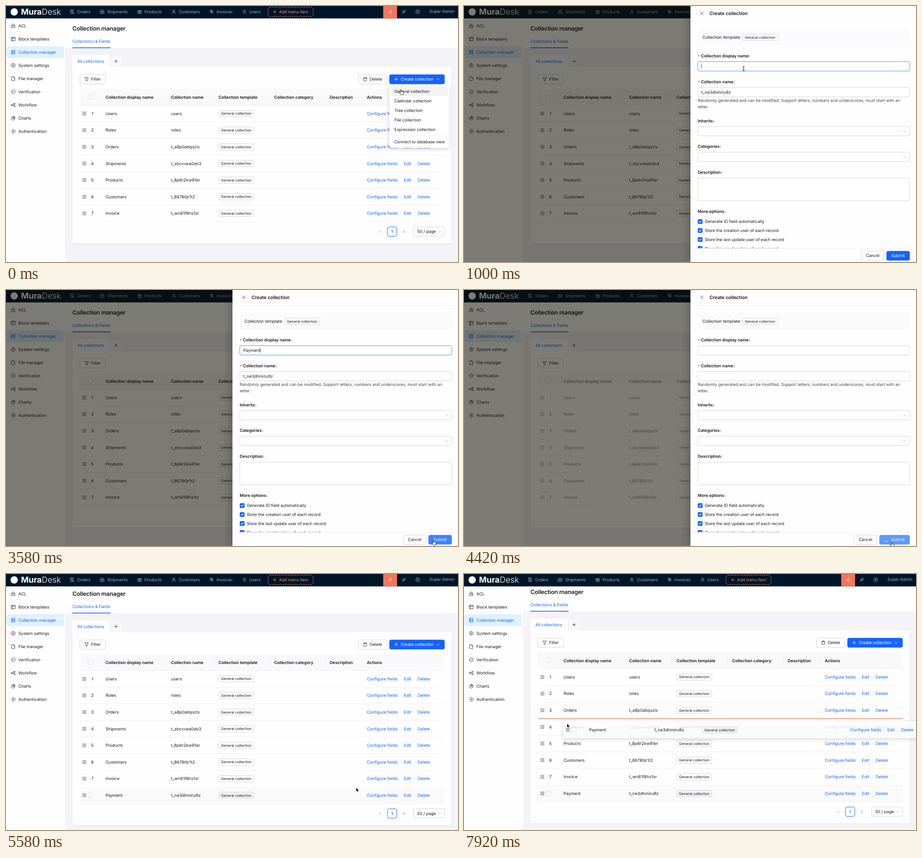
An HTML page that plays this animation: 994x563 px, repeating every 8 s.

```html
<!DOCTYPE html>
<html lang="en">
<head>
<meta charset="utf-8">
<title>Collection manager</title>
<style>
html, body { margin: 0; width: 100%; height: 100%; overflow: hidden; background: #fff; }
svg { position: fixed; left: 0; top: 0; width: 994px; height: 563px; display: block; }
text { font: 400 9.15px Inter, "Liberation Sans", sans-serif; letter-spacing: -.05px; fill: #1c1c1f; text-rendering: geometricPrecision; white-space: pre; }
.b { font-weight: 600; letter-spacing: 0; fill: #17171a; }
.h1 { font-weight: 600; font-size: 12.8px; letter-spacing: -.2px; }
.h2 { font-weight: 600; font-size: 10.4px; letter-spacing: -.1px; }
.tag { font-size: 7.95px; letter-spacing: -.04px; }
.key { letter-spacing: .05px; }
.blue { fill: #1463ff; }
.nav { fill: #a6adb4; }
.orange { fill: #f18b62; }
.white { fill: #fff; }
.soft { fill: #48484d; }
.red { fill: #ff4d4f; }
.mid { text-anchor: middle; }
.logo { font-size: 18px; letter-spacing: 0; fill: #fff; }
.i { fill: none; stroke: #333338; stroke-width: .9; stroke-linecap: round; stroke-linejoin: round; }
</style>
</head>
<body>
<svg id="stage" viewBox="0 0 994 563" xmlns="http://www.w3.org/2000/svg"></svg>
<script>
const BLUE = '#1463ff', LINE = '#d5d5d9', PALE = '#efeff2', ORANGE = '#f18b62', NAV = '#a6adb4';
const ROW = 36.6, TOP = 218.2;

// Drawing helpers; y of a text is the middle of its capitals.
const text = (x, y, s, cls = '', dy = 3.3) => `<text x="${x}" y="${y + dy}" class="${cls}">${s}</text>`;
const rect = (x, y, w, h, r, fill, stroke = 'none', more = '') =>
  `<rect x="${x}" y="${y}" width="${w}" height="${h}" rx="${r}" fill="${fill}" stroke="${stroke}" ${more}/>`;
const line = (x1, y1, x2, y2, c = PALE, w = 1) =>
  `<path d="M${x1} ${y1}L${x2} ${y2}" stroke="${c}" stroke-width="${w}" fill="none"/>`;
const icon = (x, y, d, c = '#333338', w = .9) =>
  `<path class="i" transform="translate(${x} ${y})" d="${d}" style="stroke:${c};stroke-width:${w}"/>`;
const group = (id, body, more = '') => `<g id="${id}" ${more}>${body}</g>`;
const ring = r => `M${-r} 0a${r} ${r} 0 1 0 ${2 * r} 0a${r} ${r} 0 1 0 ${-2 * r} 0`;

const ICON = {
  plus: 'M-3.3 0h6.6M0-3.3v6.6',
  down: 'M-2.8-1.3L0 1.7 2.8-1.3',
  left: 'M2-2.6L-2 0 2 2.6',
  right: 'M-2-2.6L2 0-2 2.6',
  close: 'M-3.3-3.3l6.6 6.6M3.3-3.3l-6.6 6.6',
  menu: 'M-3.9-3h7.8M-3.9 0h7.8M-3.9 3h7.8',
  filter: 'M-4-3.6h8L1.4 0v3.6h-2.8V0z',
  trash: 'M-4-2.4h8M-1.6-2.4v-1.6h3.2v1.6M-3-2.4l.3 6.4h5.4l.3-6.4',
  lock: 'M-3.5-.5h7v4.5h-7zM-2-.5v-1.7a2 2 0 0 1 4 0v1.7M0 1.2v1',
  layout: 'M-4-4h8v8h-8zM-4-1.8h8M-1.6-1.8v5.8',
  table: 'M-3.5-4h7v8h-7zM-3.5-1.4h7M-3.5 1.3h7M-2-2.7h.2M-2 0h.2M-2 2.7h.2',
  gear: 'M-1.4-4.2h2.8l.5 1.2 1.3.2 1.3 2.8-1.3 2.8-1.3.2-.5 1.2h-2.8l-.5-1.2-1.3-.2-1.3-2.8 1.3-2.8 1.3-.2z' + ring(1.4),
  file: 'M-3.3-4.2H.9L3.3-1.7v5.9h-6.6zM.9-4.2v2.5h2.4',
  check: ring(4.2) + 'M-1.8 0l1.3 1.4 2.4-2.8',
  flow: 'M-4.2-1h2.2v2.2h-2.2zM1.6-3.6h2.3v2.3h-2.3zM1.6 1.4h2.3v2.3h-2.3zM-2 0h1.4l2.2-2.4M-.6 0l2.2 2.5',
  pie: 'M-.6-3.6a4 4 0 1 0 4.2 4.2h-4.2zM1-4.2a3.4 3.4 0 0 1 3.2 3.2h-3.2z',
  login: 'M-3-3a4.2 4.2 0 1 1 0 6M-4.4 0h5.4M-.6-1.7L1.1 0-.6 1.7',
  order: 'M-3.4-4.2h6v3.4M-3.4-4.2v8.2h3M-1.8-2h3M-1.8 0h1.6M.7 1h2.8v2.8h-2.8z',
  box: 'M-4.2-.6h8.4v4.2h-8.4zM-2.9-.6l.7-3h4.4l.7 3M-1.2 1.4h2.4',
  gift: 'M-4-2h8v2.2h-8zM-3.2.2v3.8h6.4v-3.8M0-2v6M0-2l-1.8-2M0-2l1.8-2',
  user: 'M-2-2a2 2 0 1 0 4 0a2 2 0 1 0-4 0M-3.6 4a3.6 3.6 0 0 1 7.2 0',
  coin: ring(3) + 'M-4.2-1.4a4 4 0 0 1 4-2.8M0-1.5v3M-.9-.7h1.8M-.9.7h1.8',
  team: 'M-1.6-2.2a1.8 1.8 0 1 0 3.6 0a1.8 1.8 0 1 0-3.6 0M-3 3.8q.4-3 3-3.2 3 .2 3.4 3.2M-4.2-1.4l1 .8',
  pen: 'M-4 3.8l2-2M-2.4-.4l3.4-3.4 3 3-3.4 3.4zM-2.4-.4l-.4 2.4 3.4.6',
  plug: 'M-4 4l1.8-1.8M-2.2 2.2q-1.4-1.8 0-3.2l3.2 3.2q-1.6 1.2-3.2 0M2.2-2.2l1.8-1.8M2.2-2.2q1.4 1.8 0 3.2l-3.2-3.2q1.6-1.2 3.2 0'
};

const tag = (x, y, fill = '#fefefe') =>
  rect(x + .5, y - 7, 77, 14, 2.6, fill, LINE, 'class="chip"') + text(x + 5.3, y, 'General collection', 'tag', 2.9);
const box = (x, y) => rect(x, y, 10, 10, 2.4, '#fff', LINE);
const button = (x, y, w, fill = '#fff', stroke = LINE) => rect(x + .5, y + .5, w, 20.5, 4, fill, stroke);

function row(id, n, name, key) {
  const y = ROW / 2;
  return group(id,
    rect(162, 0, 803, ROW, 0, '#fafafb', 'none', 'class="hot"') +
    icon(172.3, y, ICON.menu) +
    `<g class="num">${text(190, y, n, 'mid')}</g><g class="hot">${box(180.5, y - 5)}</g>` +
    text(219, y, name) + text(363, y, key, 'key') + tag(467.5, y) +
    text(793.5, y, 'Configure fields', 'blue') + line(868.5, y - 4, 868.5, y + 4) +
    text(875, y, 'Edit', 'blue') + line(898.5, y - 4, 898.5, y + 4) + text(905, y, 'Delete', 'blue') +
    line(162, ROW, 965, ROW));
}

const rows = [['Users', 'users'], ['Roles', 'roles'], ['Orders', 't_a8p0abqszlx'], ['Shipments', 't_zbcvvea0do3'],
  ['Products', 't_8p6r2kw91er'], ['Customers', 't_8678tljr1t2'], ['Invoice', 't_wn61f8hs1sr'], ['Payment', 't_ne3dhmiru9z']];

const heads = [[219, 'Collection display name'], [363, 'Collection name'], [467.5, 'Collection template'],
  [589.5, 'Collection category'], [712, 'Description'], [793.5, 'Actions']];

const page = rect(130, 20, 864, 72.5, 0, '#fff') +
  text(146, 49, 'Collection manager', 'h1', 4.7) +
  text(146, 77.3, 'Collections &amp; Fields', 'blue') +
  rect(146, 91, 84, 1.6, 0, BLUE) +
  rect(229.5, 108.5, 26, 30, 5, '#f7f7fa', '#ececf0') + icon(242, 121.5, ICON.plus) +
  `<g filter="url(#faint)"><rect id="card" x="146" y="134" width="834" height="388" rx="5" fill="#fefefe"/></g>` +
  rect(146, 108, 82, 32, 5, '#fefefe') +
  text(157, 121.6, 'All collections', 'blue') +
  button(162, 150.5, 56) + icon(177.3, 161, ICON.filter) + text(187, 161, 'Filter') +
  button(775, 150.5, 62.5) + icon(790, 161, ICON.trash) + text(799.7, 161, 'Delete') +
  rect(843, 150.5, 121.7, 21.3, 4, BLUE) + icon(858, 161, ICON.plus, '#fff') +
  text(868, 161, 'Create collection', 'white') + icon(950, 161, ICON.down, '#fff') +
  group('table',
    rect(162, 182, 803, 36, 4, '#f9f9fb') + line(162, TOP, 965, TOP) + box(180.5, 195) +
    heads.map(([x, s]) => text(x, 200.2, s, 'b')).join('') +
    [352.5, 457.5, 579.5, 701.5, 783.5].map(x => line(x, 192, x, 208)).join('') +
    rows.map(([a, b], i) => `<g transform="translate(0 ${TOP + i * ROW})">${row('row' + i, i + 1, a, b)}</g>`).join('')) +
  group('pager',
    icon(823, 496, ICON.left, '#b9b9be') + icon(875, 496, ICON.right, '#8a8a90') +
    rect(838.8, 485.8, 20.6, 20.6, 4, '#fff', BLUE) + text(849, 496, '1', 'b blue mid') +
    button(896, 485.3, 68) + text(904.5, 496, '50 / page') + icon(953.5, 496, ICON.down, '#b4b4ba')) +
  `<path id="mark" d="M162 0H965" stroke="${ORANGE}" stroke-width="1.5"/>`;

const side = ['lock ACL', 'layout Block templates', 'table Collection manager', 'gear System settings', 'file File manager',
  'check Verification', 'flow Workflow', 'pie Charts', 'login Authentication'].map((s, i) => {
  const k = s.split(' ')[0], y = 43.6 + i * 29, on = i === 2;
  return (on ? rect(1, y - 13, 126.3, 26, 5, '#e0f1ff') : '') +
    icon(16, y, ICON[k], on ? BLUE : '#333338') + text(27.3, y, s.slice(k.length + 1), on ? 'blue' : '');
}).join('');

const nav = [[145.5, 156.5, 'order', 'Orders'], [211.5, 222.5, 'box', 'Shipments'], [294, 304.5, 'gift', 'Products'],
  [369, 380, 'user', 'Customers'], [452.5, 463, 'coin', 'Invoices'], [524.5, 535, 'team', 'Users']]
  .map(([x, tx, k, s]) => icon(x, 12.7, ICON[k], NAV) + text(tx, 12.8, s, 'nav')).join('');

const header = rect(0, 0, 994, 27.3, 0, '#001529') +
  '<circle cx="18" cy="13" r="8" fill="#fff"/>' +
  '<text x="33" y="19.3" class="logo"><tspan font-weight="700">Mura</tspan><tspan font-weight="300">Desk</tspan></text>' + nav +
  rect(576.3, 2.5, 99, 20.5, 4, 'none', ORANGE, 'stroke-dasharray="3 2"') +
  icon(591, 12.8, ICON.plus, ORANGE) + text(600.5, 12.8, 'Add menu item', 'orange') +
  rect(829.5, 0, 30.5, 27.3, 0, '#f3765a') + icon(845, 12.5, ICON.pen, '#fff') +
  icon(875, 12.5, ICON.plug, NAV) + icon(905.5, 12.5, ICON.gear, NAV) + text(931, 12, 'Super Admin', 'nav');

const menu = rect(843, 174, 132, 138, 5, '#fff', 'none', 'filter="url(#deep)"') +
  rect(847, 177, 126, 21, 3, '#f3f3f5') + line(847, 285.5, 972, 285.5) +
  ['General collection', 'Calendar collection', 'Tree collection', 'File collection', 'Expression collection', 'Connect to database view']
    .map((s, i) => text(854, i < 5 ? 187.6 + i * 21.1 : 299, s)).join('');

const label = (y, s, must) => (must ? text(514, y + 1, '*', 'red b') : '') + text(must ? 521 : 514, y, s + '\u200a:', 'b');
const input = (id, y, h = 20.5) => rect(514.2, y, 466, h, 4, '#fff', LINE, `id="${id}"`);

const form = rect(498, 0, 500, 563, 0, '#fefefe', 'none', 'filter="url(#wide)"') +
  icon(522.8, 16, ICON.close, '#55555a', 1) + text(540, 16, 'Create collection', 'h2', 3.8) + line(498, 34.5, 994, 34.5) +
  rect(514, 50, 466, 37, 4, '#fbfbfd') + text(524.3, 68.7, 'Collection template:') + tag(612.3, 68.8) +
  label(109.6, 'Collection display name', 1) +
  rect(513, 121.3, 468.4, 22.9, 5, '#1463ff', 'none', 'id="halo" fill-opacity=".12"') + input('title', 122.5) +
  group('name', text(521.7, 132.8, 'Payment')) +
  `<path id="caret" d="M0 127.5v10.5" stroke="#333" stroke-width=".9"/>` +
  label(166.4, 'Collection name', 1) + input('key', 179.3) + group('keyText', text(521.7, 189.5, 't_ne3dhmiru9z', 'key')) +
  text(514, 207.5, 'Randomly generated and can be modified. Support letters, numbers and underscores, must start with an', 'soft') +
  text(514, 222, 'letter.', 'soft') +
  label(252.3, 'Inherits') + input('parent', 265) + icon(969, 275.4, ICON.down, '#b4b4ba') +
  label(309, 'Categories') + input('kind', 321.6) + icon(969, 332, ICON.down, '#b4b4ba') +
  label(365.8, 'Description') + input('note', 378.5, 50) +
  label(451.5, 'More options') +
  ['Generate ID field automatically', 'Store the creation user of each record', 'Store the last update user of each record',
    'Store the creation time of each record'].map((s, i) => {
    const y = 474 + i * 19.75;
    return rect(514, y - 5.3, 10.6, 10.6, 2.5, BLUE) + icon(519.3, y, 'M-2.3 0l1.6 1.8 3-3.6', '#fff', 1.3) + text(529.5, y, s);
  }).join('') +
  rect(498, 533, 496, 30, 0, '#fefefe') + line(498, 533, 994, 533) +
  group('cancel', button(873, 538.5, 50) + text(883.8, 549, 'Cancel')) +
  `<rect id="submit" y="538.7" height="21" rx="4"/>` + text(939.5, 549, 'Submit', 'white') +
  `<g transform="translate(929 549)"><path id="spin" d="M-3 2.4A4 4 0 0 0 3 2.4" fill="none" stroke="#fff" stroke-width="1.1" stroke-linecap="round"/></g>`;

const pointers = {
  arrow: '<path d="M0 0v8.8l2-1.8 1.3 2.8 1.5-.7-1.3-2.7 2.8-.2z" fill="#000" stroke="#fff" stroke-width=".6"/>',
  beam: '<path d="M-2.2-5Q0-5 0-3.5V3.5Q0 5-2.2 5M2.2-5Q0-5 0-3.5M0 3.5Q0 5 2.2 5M-1.2 1.6h2.4" fill="none" stroke="#111" stroke-width="1"/>',
  hand: '<path d="M-1 1a1 1 0 0 1 2 0v3l3.6.8q1.2.4 1 1.6l-.7 4.6h-5l-3-3.6q-.8-1 .1-1.5t2 1z" fill="#fff" stroke="#111" stroke-width=".9"/>',
  grab: '<path d="M-3 4.5L-5.2.6q-.3-1.1.8-1l1.2 1.2-1-3.6q.3-1.4 1.5-.6l.6 1.6v-2.6q.7-1.2 1.6 0l.2 2.4.6-2.2q1-.8 1.5.3l-.2 2.6.8-1.2q1.2-.4 1.2.8l-.8 4.2-.8 2.2z" fill="#fff" stroke="#111" stroke-width=".9"/>',
  fist: '<path d="M-2.6 4.5L-4.4 1.5q-.2-1.4 1.2-1.2v-1.5q.8-1.4 2-.4 1-1 2 0 1-.8 1.9.2 1.4-.3 1.5 1L3.4 3 2.4 4.5z" fill="#fff" stroke="#111" stroke-width=".9"/>'
};

document.getElementById('stage').innerHTML = `<defs>
  <filter id="faint" x="-5%" y="-5%" width="110%" height="110%"><feDropShadow dx="0" dy="1" stdDeviation="1.5" flood-opacity=".07"/></filter>
  <filter id="deep" x="-20%" y="-60%" width="140%" height="220%"><feDropShadow dx="0" dy="2" stdDeviation="4.5" flood-opacity=".2"/></filter>
  <filter id="wide" x="-20%" y="-10%" width="140%" height="120%"><feDropShadow dx="-5" dy="0" stdDeviation="9" flood-opacity=".22"/></filter>
  </defs>` +
  rect(0, 0, 994, 563, 0, '#f3f3f8') + group('page', page) +
  rect(0, 0, 130, 563, 0, '#fefefe') + side + header + group('menu', menu) +
  group('ghost', rect(162, 0, 803, ROW, 0, '#fff', 'none', 'fill-opacity=".82" filter="url(#deep)"') + row('lift', 8, ...rows[7])) +
  rect(0, 0, 994, 563, 0, '#0e0c00', 'none', 'id="mask"') + group('drawer', form) +
  group('cursor', Object.entries(pointers).map(([k, d]) => group('p-' + k, d)).join(''));

const el = id => document.getElementById(id);
const show = (node, on) => { node.style.display = on ? '' : 'none'; };
const move = (id, x, y) => el(id).setAttribute('transform', `translate(${x} ${y})`);
const clamp = v => Math.max(0, Math.min(1, v));
const during = (t, a, b) => t >= a && t < b;

function along(keys, t) {
  const n = keys.findIndex(k => k[0] > t);
  if (n < 0) return keys[keys.length - 1].slice(1);
  const a = keys[n - 1], b = keys[n], p = (t - a[0]) / (b[0] - a[0]);
  return a.slice(1).map((v, i) => v + (b[i + 1] - v) * p);
}
const latest = (keys, t) => keys.filter(k => k[0] <= t).pop()[1];

const path = [[0, 868.5, 184], [330, 868.5, 184], [500, 790, 160], [670, 660, 142], [830, 615, 138], [2250, 615, 138],
  [2330, 615, 190], [2420, 615, 340], [2500, 615, 407.5], [2670, 615, 450], [2750, 615, 450], [2920, 680, 475],
  [3170, 860, 528], [3420, 940, 546], [3500, 940, 546], [3670, 940.5, 554.5], [5000, 940.5, 554.5], [5330, 770, 470],
  [5830, 770, 470], [6080, 560, 478], [6420, 200, 486], [6580, 169.5, 482], [7330, 169.5, 482], [7420, 174, 474],
  [7500, 184, 458], [7580, 198, 425], [7670, 212, 385], [7750, 220, 356], [7830, 220, 356], [7920, 226.5, 329]];
const shapes = [[0, 'hand'], [420, 'arrow'], [670, 'beam'], [2670, 'arrow'], [3420, 'hand'], [4500, 'arrow'],
  [6500, 'grab'], [6750, 'fist'], [7420, 'arrow']];
const drag = [[7420, [4, -4]], [7500, [14, -20]], [7580, [28, -52]], [7670, [42, -88]], [7750, [50, -111]], [7920, [56, -140]]];
const blink = [[0, 0], [920, 1], [1330, 0], [1580, 1], [2080, 0], [2580, 1], [3080, 0], [3580, 1], [3920, 0]];

function heat(id, on) {
  const g = el(id);
  g.querySelectorAll('.hot').forEach(n => show(n, on));
  g.querySelectorAll('.num').forEach(n => show(n, !on));
  g.querySelector('.chip').setAttribute('fill', on ? '#f3f3f5' : '#fefefe');
}

function draw(t) {
  const saved = t >= 4500, scroll = along([[0, 0], [5500, 0], [5580, 6], [5670, 10]], t)[0];
  const [x, y] = along(path, t);

  // List page
  move('page', 0, -scroll);
  el('card').setAttribute('height', saved ? 388 + ROW : 388);
  move('pager', 0, saved ? ROW : 0);
  show(el('row7'), saved);
  el('table').setAttribute('opacity', during(t, 4330, 4500) ? .5 : 1);
  const under = t >= 7420 ? 7 : t >= 5080 ? Math.floor((y + scroll - TOP) / ROW) : -1;
  rows.forEach((r, i) => heat('row' + i, i === under));
  el('menu').setAttribute('opacity', 1 - clamp((t - 170) / 230));

  // Dragged row and drop marker
  const held = t >= 7420;
  show(el('ghost'), held);
  show(el('mark'), false);
  if (held) {
    const [dx, dy] = latest(drag, t), slot = Math.round(7 + dy / ROW);
    move('ghost', dx, TOP + 7 * ROW - scroll + dy);
    move('mark', 0, TOP + slot * ROW);
    show(el('mark'), slot < 7);
    heat('lift', true);
    show(el('lift').querySelector('.hot'), false);
  }

  // Drawer
  const open = t < 4420 ? 1 - (1 - clamp((t - 250) / 400)) ** 3 : 1 - clamp((t - 4420) / 160) ** .7;
  show(el('drawer'), open > 0);
  move('drawer', 500 * (1 - open), 0);
  el('mask').setAttribute('opacity', .54 * open);
  const focus = during(t, 920, 3920), cleared = t >= 4330;
  el('title').setAttribute('stroke', focus ? '#5c9bff' : LINE);
  show(el('halo'), focus);
  el('note').setAttribute('stroke', during(t, 2580, 2830) ? '#5c9bff' : LINE);
  show(el('name'), t >= 1580 && !cleared);
  show(el('keyText'), !cleared);
  show(el('caret'), latest(blink, t));
  move('caret', t < 1580 ? 522 : 559.3, 0);

  const busy = t >= 4000;
  move('cancel', busy ? -15.6 : 0, 0);
  el('submit').setAttribute('x', busy ? 913.4 : 929);
  el('submit').setAttribute('width', busy ? 67 : 51.4);
  el('submit').setAttribute('fill', busy ? '#5c9aff' : t >= 3420 ? '#3d82ff' : BLUE);
  show(el('spin'), busy);
  el('spin').setAttribute('transform', `rotate(${(t - 4420) * .36})`);

  // Pointer
  const shape = latest(shapes, t);
  Object.keys(pointers).forEach(k => show(el('p-' + k), k === shape));
  move('cursor', x, y);
}

// The screen is refreshed twelve times a second.
const start = performance.now(), STEP = 1000 / 12;
let last = -1;
function tick() {
  const now = (performance.now() - start) % 8000;
  const n = Math.floor((now + 4) / STEP) % 96;
  if (n !== last) draw(Math.round(n * STEP / 10) * 10);
  last = n;
  requestAnimationFrame(tick);
}
tick();
</script>
</body>
</html>
```
